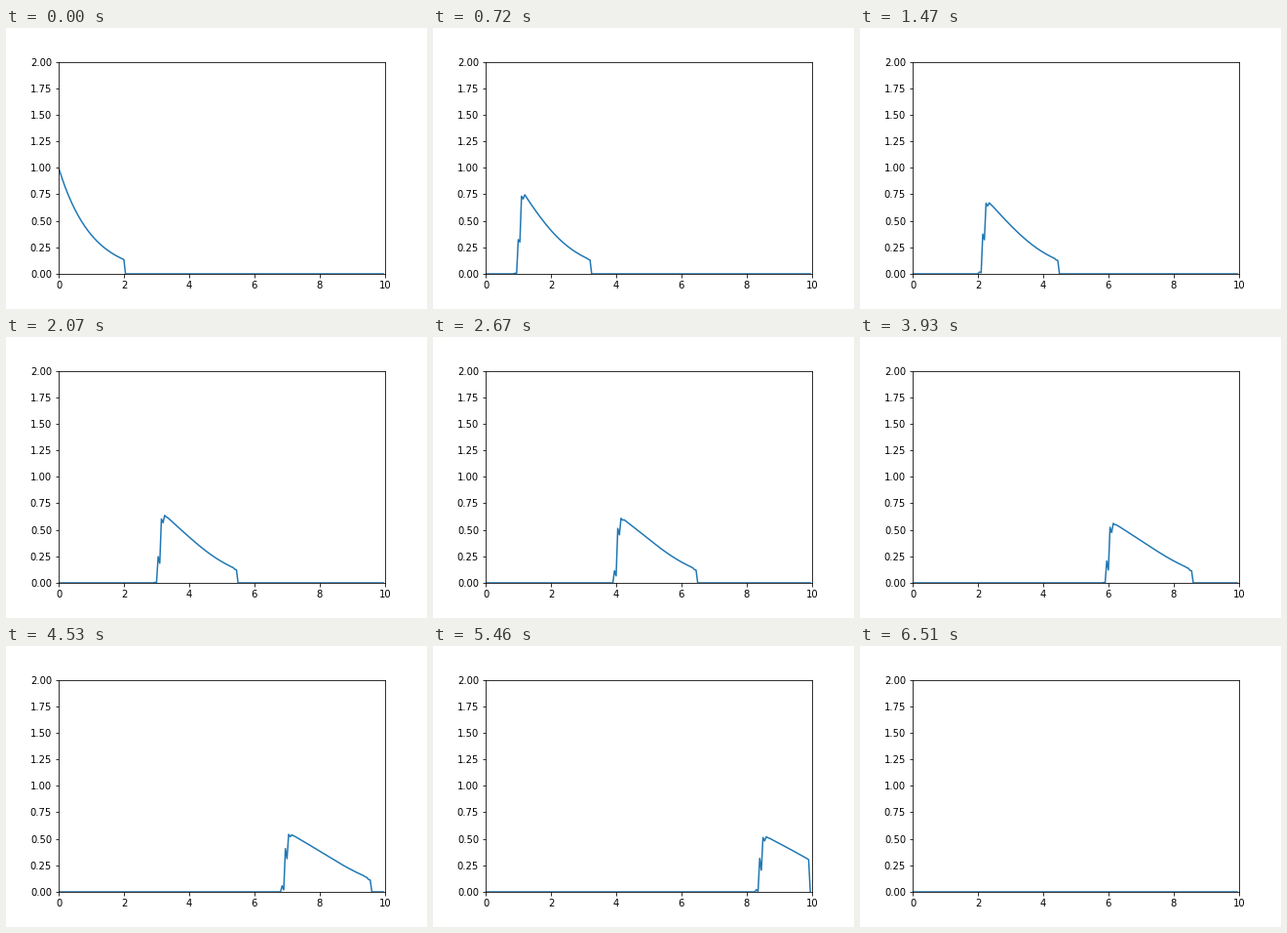
A matplotlib script for the animation above (8 s loop, 432 by 288 pixels).

```python
import numpy as np
import matplotlib.pyplot as plt
from matplotlib.animation import FuncAnimation

# Conservation law u_t + sin(u)_x = 0, Lax-Friedrichs scheme with dt = dx
DX = 0.05
CELLS = 200
STEPS = 217
INTERVAL = 10        # ms per drawn frame
FRAMES_PER_STEP = 3  # one time step every 30 ms
LOOP = 8000          # ms


def advance(u):
    left, right = u[:-2], u[2:]
    new = np.zeros_like(u)
    new[1:-1] = (left + right) / 2 - (np.sin(right) - np.sin(left)) / 2
    return new


x = DX * np.arange(CELLS)
states = [np.where(x <= 2, np.exp(-x), 0.0)]
for _ in range(STEPS):
    states.append(advance(states[-1]))

fig, ax = plt.subplots(figsize=(6, 4), dpi=72)
fig.subplots_adjust(left=0.125, right=0.9, bottom=0.125, top=0.88)
ax.set_xlim(0, 10)
ax.set_ylim(0, 2)
line, = ax.plot(x, states[0])


def draw(frame):
    step = min(frame // FRAMES_PER_STEP, STEPS)
    line.set_ydata(states[step])
    return line,


anim = FuncAnimation(fig, draw, frames=LOOP // INTERVAL, interval=INTERVAL,
                     init_func=lambda: draw(0), repeat=True, repeat_delay=0)
plt.show()
```
